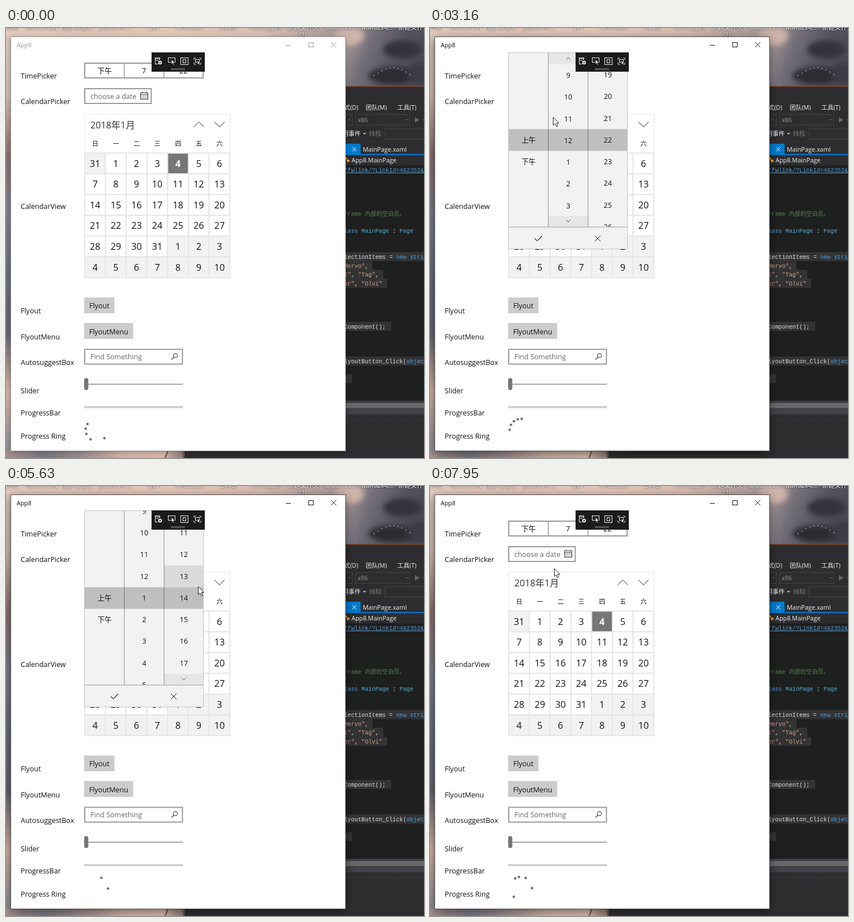
An HTML page with a canvas that plays this animation: 738x758 px, repeating every 8000 ms.

```html
<!DOCTYPE html>
<html lang="zh">
<head>
<meta charset="utf-8">
<style>
html, body { margin: 0; width: 100%; height: 100%; overflow: hidden; background: #2d2d30; }
canvas { display: block; }
</style>
</head>
<body>
<canvas id="stage" width="738" height="758"></canvas>
<script>
const ctx = document.getElementById('stage').getContext('2d');
const LOOP = 8000;
const SANS = '"Open Sans", "Noto Sans CJK SC", "Noto Sans CJK", sans-serif';
const MONO = '"Liberation Mono", "Noto Sans CJK SC", "Noto Sans CJK", monospace';

// ---------- drawing helpers ----------
function rect(x, y, w, h, color) {
  ctx.fillStyle = color;
  ctx.fillRect(x, y, w, h);
}
function frame(x, y, w, h, color, width = 1) {
  ctx.strokeStyle = color;
  ctx.lineWidth = width;
  ctx.strokeRect(x + width / 2, y + width / 2, w - width, h - width);
}
function path(points, color, width = 1, fill) {
  ctx.beginPath();
  points.forEach(([x, y]) => ctx.lineTo(x, y));
  if (fill) {
    ctx.closePath();
    ctx.fillStyle = fill;
    ctx.fill();
  }
  if (color) {
    ctx.strokeStyle = color;
    ctx.lineWidth = width;
    ctx.stroke();
  }
}
function dot(x, y, r, color, ry = r) {
  ctx.fillStyle = color;
  ctx.beginPath();
  ctx.ellipse(x, y, r, ry, 0, 0, 7);
  ctx.fill();
}
// y is the middle of the capital letters
function text(s, x, y, size = 12.5, color = '#111', align = 'left', font = SANS, weight = '') {
  ctx.font = `${weight} ${size}px ${font}`;
  ctx.textAlign = align;
  ctx.fillStyle = color;
  ctx.fillText(s, x, y + size * 0.36);
}
function chevron(x, y, w, h, color) {
  path([[x - w, y - h], [x, y + h], [x + w, y - h]], color);
}
function cross(x, y, r, color) {
  path([[x - r, y - r], [x + r, y + r]], color);
  path([[x + r, y - r], [x - r, y + r]], color);
}
function gradient(x0, y0, x1, y1, ...colors) {
  const g = ctx.createLinearGradient(x0, y0, x1, y1);
  colors.forEach((c, i) => g.addColorStop(i / (colors.length - 1), c));
  return g;
}

// ---------- timing helpers ----------
const smooth = u => u * u * (3 - 2 * u);
const easeOut = u => 1 - (1 - u) ** 3;
const clamp = u => Math.min(1, Math.max(0, u));

function track(t, keys, ease) {
  if (t <= keys[0][0]) return keys[0].slice(1);
  for (let i = 1; i < keys.length; i++) {
    const [a, b] = [keys[i - 1], keys[i]];
    if (t < b[0]) {
      const u = ease((t - a[0]) / (b[0] - a[0]));
      return a.slice(1).map((v, k) => v + (b[k + 1] - v) * u);
    }
  }
  return keys[keys.length - 1].slice(1);
}
function spline(x, [x1, y1, x2, y2]) {
  const bezier = (s, a, b) => 3 * (1 - s) ** 2 * s * a + 3 * (1 - s) * s * s * b + s ** 3;
  let lo = 0, hi = 1;
  for (let i = 0; i < 24; i++) {
    const mid = (lo + hi) / 2;
    if (bezier(mid, x1, x2) < x) lo = mid; else hi = mid;
  }
  return bezier(lo, y1, y2);
}

// ---------- motion ----------
const POINTER = [
  [70, 662, 210], [400, 400, 150], [650, 86, 110], [850, 130, 90], [1000, 168, 77],
  [1920, 168, 77], [2090, 188, 180], [2700, 190, 186], [2900, 218, 165], [3160, 217, 157],
  [3450, 220, 155], [3580, 300, 150], [3750, 330, 150], [4100, 342, 148], [4630, 315, 135],
  [4850, 315, 135], [5200, 390, 190], [5330, 405, 215], [5630, 339, 177], [5800, 339, 177],
  [6160, 330, 180], [6580, 321, 188], [6900, 468, 215], [7100, 468, 215], [7790, 250, 170],
  [7950, 219, 145]
];
const COLUMNS = [
  { x: 139, w: 70, label: i => ['上午', '下午'][i], keys: [[2250, 1], [2600, 0]] },
  { x: 209, w: 70, label: i => String((i + 11) % 12 + 1), keys: [[2850, 7], [3230, 12], [3260, 12], [3500, 13]] },
  { x: 279, w: 70, label: i => String(i % 60).padStart(2, '0'),
    keys: [[3680, 22], [4400, 16], [4750, 16], [5000, 14], [5700, 14], [5950, 13]] }
];
const ACTIVATE = 930, OPEN = 1080, CLOSE = 7040;

// ---------- backdrop ----------
function wallpaper() {
  rect(0, 0, 600, 16, gradient(0, 0, 600, 0, '#e3c9bd', '#dfc2b6', '#e3c6b9', '#dabdb1', '#a39796'));
  rect(0, 15, 9, 743, gradient(0, 15, 0, 745, '#d9c6c0', '#cdb8b1', '#8a6f70', '#7b7f8a', '#686e79', '#62656f', '#d3b3a5', '#8d8c96'));
  rect(598, 0, 140, 102, gradient(598, 0, 738, 60, '#b5a3a0', '#74707a', '#55555f', '#494953'));
  ctx.filter = 'blur(5px)';
  dot(606, 14, 26, '#cdb3aa', 17);
  dot(700, 38, 34, '#33333b', 16);
  dot(682, 84, 42, '#2b2b32', 15);
  dot(728, 80, 20, '#3c3c46', 18);
  ctx.filter = 'none';
  for (let i = 0; i < 10; i++) dot(650 + i * 7, 84 - 14 * Math.sin(i / 3), 1.2, '#85868f');

  rect(0, 745, 345, 13, gradient(0, 0, 345, 0, '#a58f8c', '#77757f', '#a08e8e', '#cfb0a5', '#d8b7a9', '#4b4548'));
  path([[286, 745], [281, 758]], '#6a4b38', 2);
  path([[312, 745], [314, 758]], '#6a4b38', 2);
  rect(315, 745, 30, 13, '#302d31');

  const icons = [['件夹', 10], ['TensorFlow', 62], ['app-acqu...', 127], ['platform-...', 193], ['QLV', 261],
    ['NetLoad...', 325], ['工具部', 392], ['Volticapper', 458], ['新建文件夹', 525], ['shadows...', 590],
    ['waifu2x-c...', 656], ['新建文件夹', 720]];
  ctx.shadowColor = '#000';
  ctx.shadowBlur = 3;
  icons.forEach(([s, x]) => text(s, x, -1, 11, '#fff', 'center'));
  text('(2)', 524, 12, 11, '#fff', 'center');
  ctx.shadowBlur = 0;
}

function code(y, parts, box) {
  if (box) rect(598, y - 8, box, 16, '#333334');
  let x = 597;
  parts.forEach(([s, color]) => {
    text(s, x, y, 10.2, color, 'left', MONO);
    x += ctx.measureText(s).width;
  });
}

function editor() {
  const blue = '#569cd6', teal = '#58aacb', plain = '#dcdcdc', string = '#d69d85', dim = '#999';
  rect(345, 102, 393, 656, '#2d2d30');
  rect(598, 102, 140, 1.5, '#8a4630');
  text('式(D)', 597, 140, 10.7, '#f1f1f1');
  text('团队(M)', 635, 140, 10.7, '#f1f1f1');
  text('工具(T)', 691, 140, 10.7, '#f1f1f1');
  frame(590, 152, 22, 20, '#434346');
  frame(617, 152, 96, 20, '#434346');
  text('x86', 621, 162, 10.7, dim);
  [606, 707].forEach(x => path([[x - 2, 161], [x + 2, 161], [x, 163]], null, 0, '#777'));
  path([[722, 157], [722, 167], [730, 162]], null, 0, '#656565');
  path([[736, 161], [738, 161], [738, 163]], null, 0, '#777');
  text('明事件', 594, 186, 10.7, '#f1f1f1');
  path([[630, 185], [636, 185], [633, 188]], null, 0, '#bbb');
  text('线程:', 641, 186, 10.7, '#777');
  frame(669, 177, 75, 19, '#434346');

  rect(598, 204, 28, 19, '#007acc');
  cross(615, 214, 3.5, '#fff');
  text('MainPage.xaml', 630, 214, 10.9, '#f1f1f1');
  rect(598, 222, 140, 2, '#007acc');
  rect(598, 224, 140, 18, '#2d2d30');
  dot(600, 230, 2, '#e8a33d');
  dot(604, 234, 2.5, '#e8a33d');
  text('App8.MainPage', 610, 233, 10.9, '#f1f1f1');

  rect(598, 242, 140, 417, '#1e1f1f');
  code(250, [['/fwlink/?LinkId=402352&', blue]]);
  rect(598, 255, 140, 1, blue);
  code(327, [['Frame 内部的空白页。', '#57804f']]);
  code(357, [['lass ', blue], ['MainPage', teal], [' : ', plain], ['Page', teal]]);
  code(403, [['lectionItems = ', plain], ['new stri', blue]], 140);
  code(419, [['Mervo"', string], [',', plain]], 49);
  code(434, [['l"', string], [', ', plain], ['"Tag"', string], [',', plain]], 68);
  code(450, [['er"', string], [', ', plain], ['"Olvi"', string]], 75);
  code(526, [['Component();', plain]], 82);
  code(587, [['lyoutButton_Click(', plain], ['objec', blue]], 140);
  code(618, [[';', plain]], 13);
  rect(598, 657, 140, 14, '#3e3e42');
  rect(598, 661, 140, 9, '#686868');
  rect(598, 671, 140, 10, '#414149');
  rect(598, 681, 140, 77, '#2d2d30');
  for (let x = 600; x < 738; x += 4) {
    rect(x, 688, 1, 1, '#46464a');
    rect(x + 2, 691, 1, 1, '#46464a');
  }
}

// ---------- app window ----------
function windowFrame(active) {
  ctx.shadowColor = active ? 'rgba(0,0,0,.5)' : 'rgba(0,0,0,.3)';
  ctx.shadowBlur = active ? 16 : 8;
  ctx.shadowOffsetY = active ? 4 : 2;
  rect(8, 15, 591, 730, '#fff');
  ctx.shadowColor = 'transparent';
  ctx.shadowBlur = ctx.shadowOffsetY = 0;
  frame(8, 15, 592, 731, active ? '#555' : '#999');

  const ink = active ? '#111' : '#999';
  text('App8', 19, 30, 10.6, ink);
  path([[494, 30.5], [503, 30.5]], ink);
  frame(534, 25, 9, 9, ink);
  cross(578.5, 29.5, 4.5, ink);
}

function calendar() {
  const pitch = 36.6, left = 139, top = 220.5;
  text('2018年1月', 149, 171, 16.2, '#333');
  chevron(340.5, 170, 9, -4.5, '#222');
  chevron(377, 170, 9, 4.5, '#222');
  [...'日一二三四五六'].forEach((d, i) => text(d, 157.5 + i * pitch, 204, 11, '#111', 'center'));
  for (let i = 0; i < 42; i++) {
    const x = left + i % 7 * pitch, y = top + Math.floor(i / 7) * pitch;
    const today = i === 4, outside = i < 1 || i > 31;
    rect(x, y, pitch, pitch, today ? '#767676' : outside ? '#f2f2f2' : '#fff');
    frame(x - 1, y - 1, pitch + 2, pitch + 2, '#e6e6e6', 2);
  }
  for (let i = 0; i < 42; i++) {
    const day = (i + 30) % 31 + 1, today = i === 4;
    text(String(day), left + (i % 7 + 0.5) * pitch, top + (Math.floor(i / 7) + 0.5) * pitch,
      16.2, today ? '#fff' : '#111', 'center', SANS, today ? 'bold' : '');
  }
  frame(138, 151.5, 258, 289, '#e6e6e6');
}

function controls(hover) {
  const border = '#999';
  [['TimePicker', 84], ['CalendarPicker', 129], ['CalendarView', 314], ['Flyout', 498], ['FlyoutMenu', 544],
    ['AutosuggestBox', 589], ['Slider', 639], ['ProgressBar', 678], ['Progress Ring', 719]]
    .forEach(([s, y]) => text(s, 26, y));

  frame(138, 61, 211, 28, hover ? '#666' : border, 2);
  rect(208, 62, 1.5, 26, border);
  rect(278, 62, 1.5, 26, border);
  ['下午', '7', '22'].forEach((s, i) => text(s, 174 + i * 69.7, 75, 12.8, '#111', 'center'));

  frame(138, 106, 119.5, 28, border, 2);
  text('choose a date', 149, 120, 12.5, '#666');
  frame(237, 114, 14, 12, '#333');
  path([[237, 117.5], [251, 117.5]], '#333');
  [240, 247].forEach(x => rect(x, 112, 1, 3, '#333'));
  for (let i = 0; i < 8; i++) rect(239 + i % 4 * 3, 119.5 + (i >> 2) * 3, 1.3, 1.3, '#333');

  calendar();

  rect(138, 475, 53.5, 28, '#ccc');
  text('Flyout', 164.8, 489, 12.5, '#111', 'center');
  rect(138, 520, 86.5, 28, '#ccc');
  text('FlyoutMenu', 181.3, 535, 12.5, '#111', 'center');

  frame(138, 565.5, 174.5, 28, border, 2);
  text('Find Something', 149, 579.5, 12.5, '#666');
  ctx.strokeStyle = '#222';
  ctx.lineWidth = 1;
  ctx.beginPath();
  ctx.arc(299, 577.5, 3.7, 0, 7);
  ctx.stroke();
  path([[296.4, 580.2], [292, 584.6]], '#222', 1.2);

  rect(142, 627, 170.5, 1.7, '#999');
  ctx.fillStyle = '#767676';
  ctx.beginPath();
  ctx.roundRect(138, 617, 7.3, 21, 3.6);
  ctx.fill();
  rect(138, 666.5, 174.5, 3.7, '#ccc');
}

// Five dots follow the same eased turns, each a little later than the one before.
function progressRing(t) {
  const times = [0, 0.433, 1.2, 1.617, 2.017, 2.783, 3.217];
  const angles = [-110, 10, 93, 205, 357, 439, 585];
  const drift = [.28, .35, .65, .75];
  const curves = [[.13, .21, .1, .7], drift, [.57, .17, .95, .75], [0, .19, .07, .72], drift, [0, 0, .9, .55]];
  const cycle = (t / 1000 + 2.308) % 4.25;
  for (let i = 0; i < 5; i++) {
    const local = cycle - i * 0.167;
    const k = times.findIndex(v => v > local) - 1;
    if (k < 0) continue;
    const u = spline((local - times[k]) / (times[k + 1] - times[k]), curves[k]);
    const a = (angles[k] + (angles[k + 1] - angles[k]) * u - i * 6) * Math.PI / 180;
    dot(160.3 - 19.7 * Math.cos(a), 708.7 - 19.7 * Math.sin(a), 2.3, '#767676');
  }
}

function column({ x, w, label, keys }, t, px, py) {
  const pitch = 38.25, middle = 197.3;
  const [value] = track(t, keys, easeOut);
  const inside = px >= x && px < x + w && py > 43 && py < 350;
  const row = Math.round((py - middle) / pitch);
  const resting = Math.abs(value - Math.round(value)) < 0.005;
  if (inside && resting && row && label(value + row)) rect(x, middle + (row - 0.5) * pitch, w, pitch, '#dadada');

  const base = Math.round(value);
  for (let i = base - 5; i <= base + 5; i++) {
    const s = label(i);
    if (s) text(s, x + w / 2, middle + (i - value) * pitch, 12.6, '#111', 'center');
  }
  if (!inside) return;
  rect(x, 44, w, 19.5, '#e6e6e6');
  rect(x, 331, w, 19.5, '#e6e6e6');
  chevron(x + w / 2, 54, 4, -2, '#555');
  chevron(x + w / 2, 340, 4, 2, '#555');
}

function timeFlyout(t, px, py) {
  if (t < OPEN || t > CLOSE + 90) return;
  const grow = easeOut(clamp((t - OPEN) / 250));
  ctx.save();
  ctx.globalAlpha = 1 - clamp((t - CLOSE) / 90);
  ctx.beginPath();
  ctx.rect(138, 197 - 154 * grow, 211.5, 347 * grow);
  ctx.clip();
  rect(138, 43, 211.5, 347, '#f2f2f2');
  rect(138, 178.3, 211, 38.2, '#bfbfbf');
  ctx.save();
  ctx.beginPath();
  ctx.rect(138, 43, 211, 307);
  ctx.clip();
  COLUMNS.forEach(c => column(c, t, px, py));
  [208, 278.3].forEach(x => rect(x, 43, 1.7, 307, 'rgba(0,0,0,.25)'));
  ctx.restore();
  rect(138, 350, 211, 1.7, '#bfbfbf');
  path([[185, 371], [189.3, 375.3], [198, 366.5]], '#222', 1.1);
  cross(296, 371, 5, '#222');
  frame(138, 43, 211, 347, '#c4c4c4');
  ctx.restore();
}

function pointerIcon(x, y, scale, fill, stroke) {
  const shape = [[0, 0], [0, 14], [3.2, 11], [5.6, 16.3], [7.9, 15.3], [5.6, 10.2], [10, 10.2], [0, 0]];
  path(shape.map(([a, b]) => [x + a * scale, y + b * scale]), stroke, 1, fill);
}

function debugToolbar() {
  const ink = '#f1f1f1';
  rect(257, 43, 94, 34, '#1b1b1c');
  frame(263, 52, 9, 12, ink);
  rect(263, 54, 9, 1, ink);
  rect(265, 57, 4, 1, ink);
  dot(272, 61, 4, '#1b1b1c');
  dot(272, 61, 3.2, ink);
  dot(272, 61, 1.2, '#1b1b1c');
  frame(286, 52, 13, 9, ink);
  pointerIcon(292, 55, 0.65, ink, '#1b1b1c');
  frame(308, 52, 14, 13, ink);
  frame(312, 55, 6, 7, ink);
  for (const [x, y, dx, dy] of [[332, 53, 1, 1], [344, 53, -1, 1], [332, 64, 1, -1], [344, 64, -1, -1]])
    path([[x + 3 * dx, y], [x, y], [x, y + 3 * dy]], ink);
  frame(334, 55, 8, 6, ink);
  pointerIcon(338, 57, 0.55, ink, '#1b1b1c');
  rect(291, 71, 25, 1, '#777');
  rect(291, 73, 25, 1, '#777');
}

function draw(now) {
  const t = now % LOOP;
  const [px, py] = track(t, POINTER, smooth);
  const overPicker = t > 70 && px > 138 && px < 349 && py > 61 && py < 89;
  wallpaper();
  editor();
  windowFrame(t >= ACTIVATE);
  controls(overPicker);
  progressRing(t);
  timeFlyout(t, px, py);
  debugToolbar();
  if (t >= 70) pointerIcon(px + 0.5, py + 0.5, 1, '#fff', '#222');
  requestAnimationFrame(() => draw(performance.now() - start));
}
const start = performance.now();
draw(0);
</script>
</body>
</html>
```
